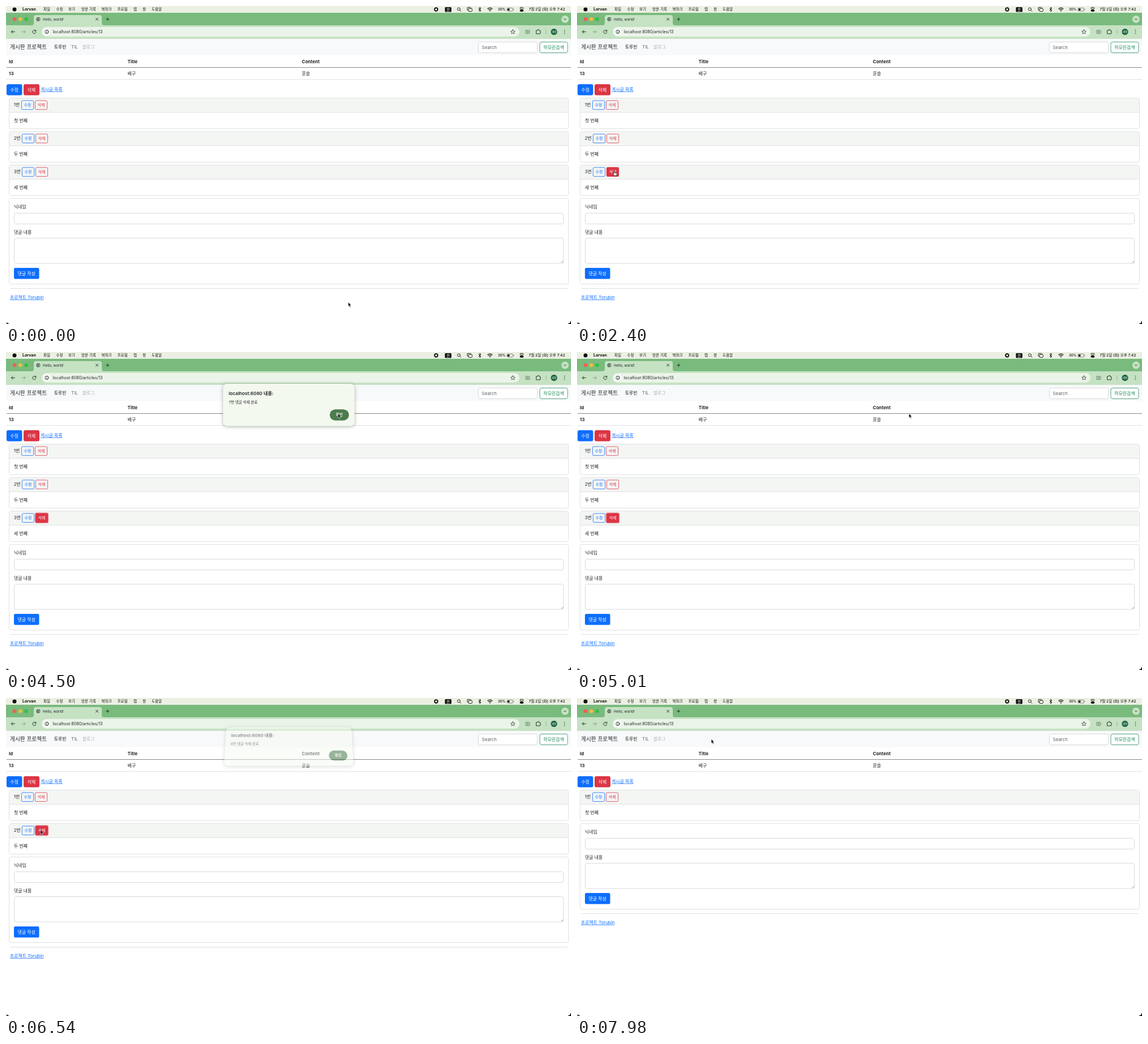
An HTML page for the animation above (8000 ms loop, 997 by 561 pixels).

```html
<!DOCTYPE html>
<html lang="ko">
<head>
<meta charset="utf-8">
<title>Hello, world!</title>
<style>
html, body { margin: 0; width: 100%; height: 100%; overflow: hidden; background: #fff; }
svg { position: absolute; left: 0; top: 0; display: block; overflow: visible; }
text { font: 7.9px Inter, "Noto Sans CJK KR", "Noto Sans CJK", sans-serif; fill: #212529; white-space: pre; }
.bold { font-weight: 700; }
.semi { font-weight: 600; }
.mid { text-anchor: middle; }
.white { fill: #fff; }
.menu text { font-size: 6.5px; font-weight: 500; fill: #111; }
.link { fill: #0d6efd; text-decoration: underline; }
.small { font-size: 6.9px; text-anchor: middle; }
.icon { fill: none; stroke: #26352a; stroke-width: 1; stroke-linecap: round; stroke-linejoin: round; }
.field { fill: #fff; stroke: #d6dade; }
.blue { fill: #0d6efd; }
.red { fill: #dc3545; }
.edge-blue { fill: none; stroke: #0d6efd; stroke-width: .8; }
.edge-red { fill: none; stroke: #dc3545; stroke-width: .8; }

/* hard changes */
.step { animation: 8s step-end infinite; }
#row3 { animation-name: row3; }
#row2 { animation-name: row2; }
#form { animation-name: form; }
#hot3 { animation-name: hot3; }
#hot2 { animation-name: hot2; }
#ring3 { animation-name: ring3; }
#ring2 { animation-name: ring2; }
#okHot { animation-name: okHot; }
#msg7 { animation-name: msg7; }
#msg6 { animation-name: msg6; }
#arrow { animation-name: arrow; }
#hand { animation-name: hand; }
@keyframes row3 { 0% { opacity: 1 } 63%, 100% { opacity: 0 } }
@keyframes row2 { 0% { opacity: 1 } 97.125%, 100% { opacity: 0 } }
@keyframes form {
  0% { transform: none }
  63% { transform: translateY(-59px) }
  97.125%, 100% { transform: translateY(-118px) }
}
@keyframes hot3 { 0% { opacity: 0 } 25.6%, 100% { opacity: 1 } }
@keyframes hot2 { 0% { opacity: 0 } 77%, 100% { opacity: 1 } }
@keyframes ring3 { 0% { opacity: 0 } 31.5%, 100% { opacity: 1 } }
@keyframes ring2 { 0% { opacity: 0 } 80.25%, 100% { opacity: 1 } }
@keyframes okHot { 0% { opacity: 0 } 52% { opacity: 1 } 65% { opacity: 0 } 91%, 100% { opacity: 1 } }
@keyframes msg7 { 0% { opacity: 1 } 65%, 100% { opacity: 0 } }
@keyframes msg6 { 0% { opacity: 0 } 65%, 100% { opacity: 1 } }
@keyframes arrow { 0% { opacity: 1 } 25.6% { opacity: 0 } 32.25% { opacity: 1 } 77% { opacity: 0 } 81%, 100% { opacity: 1 } }
@keyframes hand { 0% { opacity: 0 } 25.6% { opacity: 1 } 32.25% { opacity: 0 } 77% { opacity: 1 } 81%, 100% { opacity: 0 } }

#dialog {
  left: 383px; top: 56px; transform-origin: 50% 100%;
  filter: drop-shadow(0 1px 3px rgba(30, 60, 30, .4));
  animation: dialog 8s linear infinite;
}
@keyframes dialog {
  0%, 32.25% { opacity: 0; transform: perspective(600px) translateY(-22px) scale(.97) rotateX(32deg) }
  33.75%, 60.75% { opacity: 1; transform: perspective(600px) translateY(0) scale(1) rotateX(0deg) }
  62.25% { opacity: 0; transform: perspective(600px) translateY(0) scale(1) rotateX(0deg) }
  62.26%, 81% { opacity: 0; transform: perspective(600px) translateY(-22px) scale(.97) rotateX(32deg) }
  82.5%, 94.875% { opacity: 1; transform: perspective(600px) translateY(0) scale(1) rotateX(0deg) }
  96.375%, 100% { opacity: 0; transform: perspective(600px) translateY(0) scale(1) rotateX(0deg) }
}

#cursor { animation: cursor 8s infinite; }
@keyframes cursor {
  0% { transform: translate(604px, 522.5px) }
  14.25% { transform: translate(604px, 522.5px); animation-timing-function: ease-in-out }
  27% { transform: translate(65px, 291px) }
  34.5% { transform: translate(65px, 291px); animation-timing-function: cubic-bezier(.45, 0, .75, .7) }
  43.125% { transform: translate(404px, 179px); animation-timing-function: cubic-bezier(.2, .5, .5, 1) }
  53.25% { transform: translate(585.7px, 108.5px) }
  65.25% { transform: translate(585.7px, 108.5px); animation-timing-function: cubic-bezier(.45, 0, .75, .7) }
  70.5% { transform: translate(389.5px, 161.5px); animation-timing-function: cubic-bezier(.25, .4, .5, 1) }
  78.375% { transform: translate(61px, 232.5px) }
  85.5% { transform: translate(61px, 232.5px); animation-timing-function: ease-in-out }
  91.5% { transform: translate(585.7px, 108.5px) }
  95.25% { transform: translate(585.7px, 108.5px); animation-timing-function: ease-in-out }
  99.75%, 100% { transform: translate(237px, 72.5px) }
}
</style>
</head>
<body>
<svg width="997" height="561">
  <defs>
    <g id="card">
      <rect x="5.5" y=".5" width="987" height="54" rx="3" fill="#fff" stroke="#dfe1e0"/>
      <path d="M6 25V3.500q0-2.500 2.500-2.500H989.500q2.500 0 2.500 2.500V25z" fill="#f4f6f4"/>
      <path d="M6 25.500H992" stroke="#dfe1e0"/>
    </g>
    <g id="tools">
      <rect class="edge-blue" x=".4" y="4.900" width="21.200" height="15.700" rx="2"/>
      <rect class="edge-red" x="24.400" y="4.900" width="21.200" height="15.700" rx="2"/>
      <text class="small blue" x="11" y="15.300">수정</text>
      <text class="small red" x="35" y="15.300">삭제</text>
    </g>
    <g id="hot">
      <rect class="red" x="24" y="4.500" width="22" height="16.500" rx="2"/>
      <text class="small white" x="35" y="15.300">삭제</text>
    </g>
    <rect id="ring" x="23.500" y="4" width="23" height="17.500" rx="2.500" fill="none" stroke="#dc3545" stroke-opacity=".5" stroke-width="1.400"/>
  </defs>

  <!-- menu bar -->
  <rect width="997" height="12" fill="#ebf0e3"/>
  <g class="menu">
    <circle cx="15" cy="6" r="3.500" fill="#111"/>
    <text class="bold" x="29" y="8.400" style="font-weight:700;font-size:7px">Lorvan</text>
    <text x="66" y="8.400">파일</text>
    <text x="88.500" y="8.400">수정</text>
    <text x="110" y="8.400">보기</text>
    <text x="133" y="8.400">방문 기록</text>
    <text x="168.500" y="8.400">북마크</text>
    <text x="196.500" y="8.400">프로필</text>
    <text x="225" y="8.400">탭</text>
    <text x="241" y="8.400">창</text>
    <text x="257" y="8.400">도움말</text>
    <circle cx="759" cy="6" r="3.700" fill="#111"/>
    <rect x="757.500" y="4.500" width="3" height="3" fill="#fff"/>
    <rect x="774.500" y="2" width="11.500" height="8.500" rx="1.500" fill="#111"/>
    <text class="mid" x="780.200" y="8.600" style="fill:#fff">한</text>
    <text x="868" y="8.300" style="font-size:5.900px">30%</text>
    <text x="922.500" y="8.400" style="font-size:6.600px">7월 2일 (화) 오후 7:42</text>
  </g>
  <g class="icon" style="stroke:#111;stroke-width:.9">
    <circle cx="799" cy="5.500" r="2.500"/><path d="M801 7.500l2 2"/>
    <rect x="814" y="2.500" width="6.500" height="5" rx="1"/>
    <rect x="816" y="4.500" width="6.500" height="5" rx="1" fill="#ebf0e3"/>
    <path d="M834 4l4 4-2 2V2l2 2-4 4"/>
    <path d="M850 4.800q4-3.200 8 0M851.500 6.600q2.500-2 5 0" stroke-width="1.200"/>
    <rect x="884" y="3.500" width="10.500" height="5.500" rx="1.500" stroke="#777"/>
    <rect x="907" y="2.500" width="6" height="2.600" rx="1.300"/>
    <rect x="907" y="6.800" width="6" height="2.600" rx="1.300" fill="#111"/>
  </g>
  <circle cx="854" cy="8.600" r="1" fill="#111"/>
  <rect x="885" y="4.500" width="3.500" height="3.500" rx=".7" fill="#111"/>
  <path d="M896 5.200v2" stroke="#777"/>

  <!-- browser frame -->
  <rect y="12" width="997" height="23" fill="#79ba7d"/>
  <rect y="34" width="997" height="24" fill="#c5e2c3"/>
  <path d="M45 34q4 0 4-4V20q0-4 4-4H165q4 0 4 4V30q0 4 4 4z" fill="#c5e2c3"/>
  <circle cx="15" cy="23.300" r="3.300" fill="#f45e55"/>
  <circle cx="25.300" cy="23.300" r="3.300" fill="#f5bd3c"/>
  <circle cx="35.500" cy="23.300" r="3.300" fill="#2fc143"/>
  <circle cx="57" cy="23.300" r="3.500" fill="#4d5a50"/>
  <path d="M54.500 22l2 1-.5 2M57 20.500l1 1.500 2 .5M58 26l.5-2 1.500-.5" fill="none" stroke="#c5e2c3" stroke-width=".9"/>
  <text x="65" y="25.600" style="font-size:6.200px">Hello, world!</text>
  <rect x="63" y="37" width="843" height="17" rx="8.500" fill="#ebf4e8"/>
  <circle cx="72" cy="45.500" r="6.300" fill="#fff"/>
  <circle cx="986.500" cy="23.300" r="6.500" fill="#c5e2c3"/>
  <g class="icon">
    <path d="M158.500 21.300l4 4m0-4l-4 4M176.800 23.300h5m-2.500-2.500v5M984.500 22.500l2 2 2-2"/>
    <path d="M15.500 45.500h-6m2.500-2.700l-2.700 2.700 2.700 2.700"/>
    <path d="M28 45.500h6m-2.500-2.700l2.700 2.700-2.700 2.700" stroke="#8aa48b"/>
    <path d="M52.300 43.800a3 3 0 1 0 .5 2.400M52.800 42.300v2h-2"/>
    <circle cx="72" cy="45.500" r="3.200"/><path d="M72 45.300v1.700M72 43.700v.1"/>
    <path d="M894.500 41.800l1.100 2.400 2.700.3-2 1.800.6 2.600-2.400-1.300-2.400 1.300.6-2.600-2-1.800 2.700-.3z" stroke-width=".8"/>
    <rect x="917" y="43" width="7" height="5.500" rx="1" stroke="#6c7d6e"/>
    <circle cx="920.500" cy="45.800" r="1.200" stroke="#6c7d6e"/>
    <path d="M936 43h2.200q0-1.800 1.200-1.800t1.200 1.800h1.900v2.200q1.200 0 1.200 1t-1.200 1V49H936z"/>
    <path d="M953 42v7" stroke="#91b592"/>
    <path d="M985.500 42.500v.1M985.500 45.500v.1M985.500 48.500v.1" stroke-width="1.500"/>
  </g>
  <text x="82.500" y="48.200" style="font-size:7.200px">localhost:8080/articles/13</text>
  <circle cx="967" cy="45.500" r="5.600" fill="#17613f"/>
  <text class="mid white" x="967" y="47.400" style="font-size:4.600px">새봄</text>

  <!-- navigation -->
  <rect y="58" width="997" height="28.500" fill="#f8f9fa"/>
  <text x="7" y="76" style="font-size:9.700px">게시판 프로젝트</text>
  <text x="85" y="75.300" style="font-size:7.700px;fill:#111">토루빈</text>
  <text x="115" y="75.300" style="font-size:8px;fill:#66696c">TIL</text>
  <text x="135" y="75.300" style="font-size:7.700px;fill:#acaeb0">블로그</text>
  <rect class="field" x="833.500" y="63.500" width="104" height="19" rx="3"/>
  <text x="839.500" y="75.700" style="font-size:8px;fill:#5c6268">Search</text>
  <rect x="942" y="63.500" width="49" height="19" rx="3" fill="#fff" stroke="#3f9a70" stroke-width=".9"/>
  <text class="mid" x="966.500" y="75.700" style="fill:#198754">하모린검색</text>

  <!-- article -->
  <g class="bold">
    <text class="bold" x="5" y="100.800" style="font-size:8px">Id</text>
    <text class="bold" x="214.500" y="100.800" style="font-size:8px">Title</text>
    <text class="bold" x="522" y="100.800" style="font-size:8px">Content</text>
    <text class="bold" x="5" y="121.800" style="font-size:8px">13</text>
  </g>
  <text x="214.500" y="121.800">배구</text>
  <text x="522" y="121.800">윤솔</text>
  <path d="M1 108.500H997" stroke="#85888b"/>
  <path d="M1 129.500H997" stroke="#dee2e6"/>
  <rect class="blue" x="1" y="138" width="27.500" height="19.500" rx="3"/>
  <rect class="red" x="31" y="138" width="28" height="19.500" rx="3"/>
  <text class="mid white" x="14.800" y="150.500">수정</text>
  <text class="mid white" x="45" y="150.500">삭제</text>
  <text class="link" x="61" y="149.700">게시글 목록</text>

  <!-- comments -->
  <g transform="translate(0 162)">
    <use href="#card"/><use href="#tools" x="27"/>
    <text x="13.800" y="15">1번</text><text x="14" y="42.700">첫 번째</text>
  </g>
  <g transform="translate(0 221)">
    <g id="row2" class="step">
      <use href="#card"/><use href="#tools" x="28"/>
      <text x="13.800" y="15">2번</text><text x="14" y="42.700">두 번째</text>
      <g id="hot2" class="step"><use href="#hot" x="28"/></g>
      <g id="ring2" class="step"><use href="#ring" x="28"/></g>
    </g>
  </g>
  <g transform="translate(0 280)">
    <g id="row3" class="step">
      <use href="#card"/><use href="#tools" x="28"/>
      <text x="13.800" y="15">3번</text><text x="14" y="42.700">세 번째</text>
      <g id="hot3" class="step"><use href="#hot" x="28"/></g>
      <g id="ring3" class="step"><use href="#ring" x="28"/></g>
    </g>
  </g>

  <g id="form" class="step">
    <rect x="5.500" y="339.500" width="987" height="151" rx="3" fill="#fff" stroke="#dfe1e0"/>
    <text x="14" y="357">닉네임</text>
    <rect class="field" x="14.500" y="365.500" width="969" height="19" rx="3"/>
    <text x="14" y="401.600">댓글 내용</text>
    <rect class="field" x="14.500" y="409.500" width="969" height="44.500" rx="3"/>
    <path d="M979.500 453l3.500-3.500M981.500 453l1.500-1.500" stroke="#888" stroke-width=".7"/>
    <rect class="blue" x="14" y="462" width="44.500" height="19.500" rx="2.500"/>
    <text class="mid white" x="36.200" y="474.600">댓글 작성</text>
    <path d="M7 498.500H991" stroke="#dedfe0"/>
    <text class="link" x="7" y="516.800">프로젝트 Torubin</text>
  </g>
  <path d="M1 556q0 4 4 4v1H1zM996 556q0 4-4 4v1h5v-5z" fill="#111"/>
</svg>

<svg id="dialog" width="232" height="74.500">
  <rect width="232" height="74.500" rx="7" fill="#f4f9f0"/>
  <text class="semi" x="10" y="19.500" style="font-size:8.100px">localhost:8080 내용:</text>
  <text id="msg7" class="step" x="10" y="34.700" style="font-size:6.500px">7번 댓글 삭제 완료</text>
  <text id="msg6" class="step" x="10" y="34.700" style="font-size:6.500px">6번 댓글 삭제 완료</text>
  <rect x="188.500" y="45.500" width="33.500" height="19" rx="9.500" fill="#336a35"/>
  <rect id="okHot" class="step" x="188.500" y="45.500" width="33.500" height="19" rx="9.500" fill="#4b7c4c"/>
  <text class="mid white semi" x="205.200" y="57.400" style="font-size:6.500px">확인</text>
</svg>

<svg width="997" height="561">
  <g id="cursor">
    <path id="arrow" class="step" d="M0 0V7.600l1.700-1.500 1.200 2.900 1.400-.6-1.200-2.800h2.200z" fill="#000" stroke="#fff" stroke-width=".6"/>
    <path id="hand" class="step" d="M.2 0q1-.8 1.500.4V3l3 .8q.9.3.7 1.400L5 8.500H1L-1.600 5.200q0-1.200 1.200-.6L.2 5z" fill="#fff" stroke="#111" stroke-width=".8"/>
  </g>
</svg>
</body>
</html>
```
